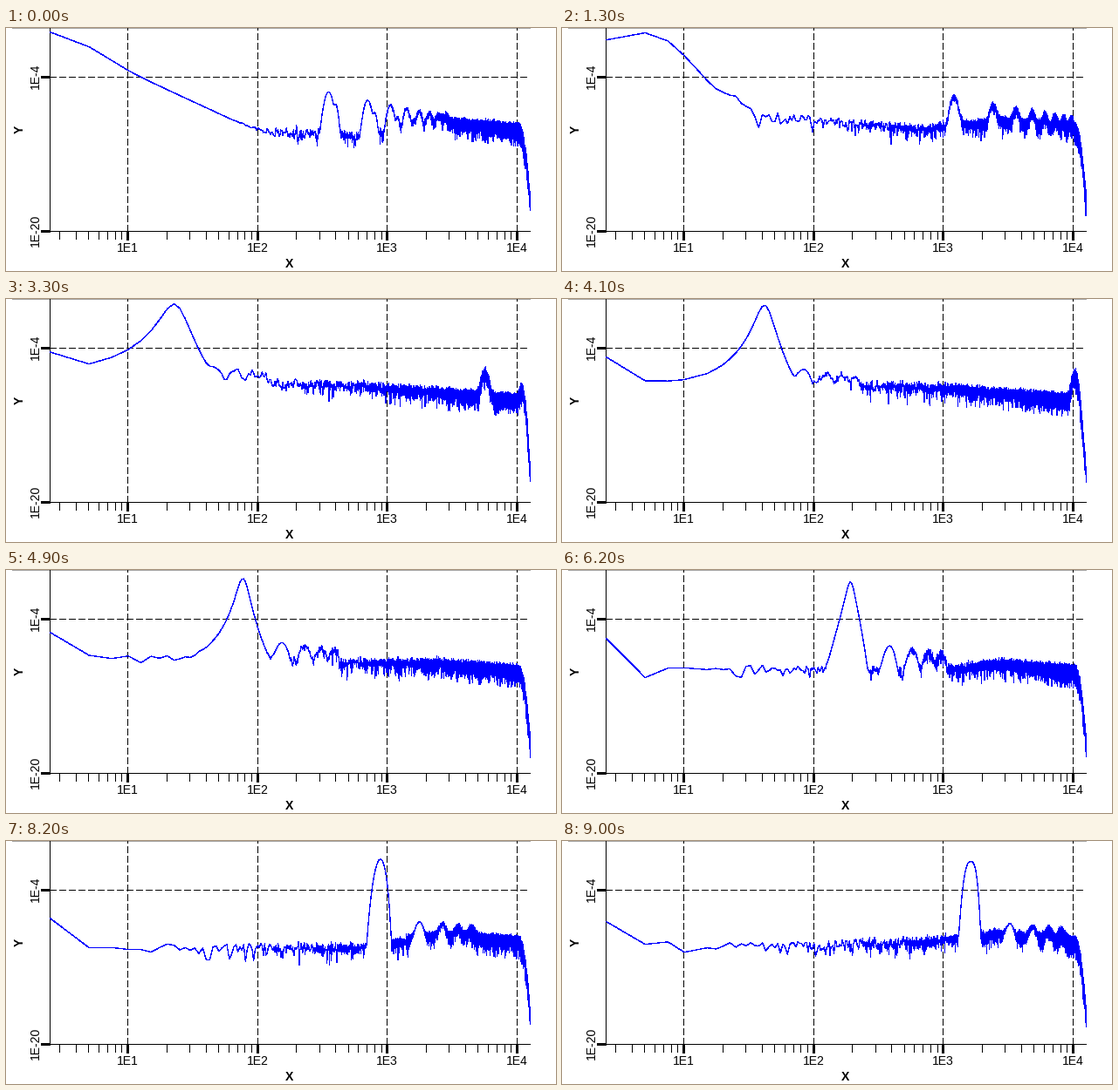
These frames come from a looping animation (630x279 px, 9300 ms). A matplotlib script:

```python
import numpy as np
import matplotlib.pyplot as plt
from matplotlib.animation import FuncAnimation

W, H, DPI = 630, 279, 100
PX = 72 / DPI            # points per pixel
LEFT, RIGHT, BOTTOM = 50, 600, 233
DECADE_X = 148.7         # pixels per decade of frequency
DECADE_Y = 11.06         # pixels per decade of power
STEP_MS, LOOP_MS = 100, 9300

plt.rcParams["font.family"] = "Liberation Sans"

BINS = np.arange(1, 5001)
X = LEFT + DECADE_X * np.log10(BINS)
# One step every 400 ms, after a short first one and a longer one at 4.9 s
STARTS = [0] + [100 + 400 * j + (100 if j > 12 else 0) for j in range(23)]


def power(y):
    return 10 ** (-np.minimum(y, 400) / DECADE_Y)


def floor(i):
    """Noise floor, whose left and middle parts sway with time."""
    left = 107 - 15 * np.cos(2 * np.pi * (i - 8.5) / 24)
    mid = 111 - 12 * np.cos(2 * np.pi * (i - 9.7) / 19)
    return power(np.interp(X, [245, 415, 500, 586], [left, mid, 106, 114]))


def skirt(i):
    """Leakage around zero frequency, sinking and steepening."""
    return power(8 + 17.5 * np.sqrt(i) + (30 + 5 * i) * np.log(BINS))


def main_tone(i, noise):
    """Swept tone with its first harmonics."""
    k0 = 10 ** ((192 + 19.7 * (i - 9) - LEFT) / DECADE_X)
    total = 0
    for h in range(1, 6):
        u = np.abs(BINS - h * k0) / (3 + .14 * h * k0)
        if h == 1:
            b = np.clip((i - 15) / 8, 0, 1)
            drop = (1 - b) * 28 * np.log(1 + 4 * u ** 2) + b * 38 * u ** 2.8
            total += power(5 + 1.4 * max(0, i - 10) + drop)
        else:
            top = 83 + 1.2 * (i - 13) + 3 * (h - 2)
            total += power(top + 30 * u ** 2) * noise ** (.25 * (h - 2))
    return total


def upper_tone(i, noise):
    """Second, higher tone; each harmonic has a weaker shoulder."""
    total = 0
    for h in range(1, 9):
        x = X - (369 + 19.9 * i + DECADE_X * np.log10(h))
        top = 73 + 1.2 * i + 13.5 * np.log(h)
        w = 7 / (1 + .06 * (h - 1))
        bump = (power(top + 23 * (x / w) ** 2)
                + power(top + 14 + 3 * i + 20 * ((x - 8) / 4) ** 2))
        total += bump * noise ** min(.8, .08 * i + .06 * (h - 1))
    return total


def spectrum(i):
    rng = np.random.default_rng(40 + i)
    noise = np.maximum(rng.exponential(size=len(X)), .003)
    total = (floor(i) * noise ** .75 + skirt(i)
             + main_tone(i, noise) + upper_tone(i, noise))
    roll = 85 * (np.maximum(X - 587, 0) / 13) ** 2
    return np.minimum(roll - DECADE_Y * np.log10(total), BOTTOM)


CURVES = [spectrum(i) for i in range(len(STARTS))]

fig = plt.figure(figsize=(W / DPI, H / DPI), dpi=DPI, facecolor="white")
ax = fig.add_axes([0, 0, 1, 1])
ax.set_xlim(0, W)
ax.set_ylim(H, 0)
ax.axis("off")


def rule(x0, y0, x1, y1, width=1, color="black", style="-"):
    ax.plot([x0, x1], [y0, y1], color=color, lw=width * PX, ls=style,
            aa=False, solid_capstyle="butt", dash_capstyle="butt")


def label(x, y, text, turn=0, weight="normal"):
    ax.text(x, y, text, fontsize=14 * PX, rotation=turn, weight=weight,
            ha="center", va="center")


def tick_x(freq):
    return int(LEFT + DECADE_X * np.log10(freq / 2.5))


DASH = (0, (7, 4))
rule(7, 0, RIGHT, 0, color="#a8a8a8")
rule(LEFT, 56, RIGHT, 56, style=DASH)
for e in range(1, 5):
    x = tick_x(10 ** e)
    rule(x, BOTTOM, x, 0, style=DASH)
    rule(x, BOTTOM, x, BOTTOM + 10, width=3)
    label(x, 253, f"1E{e}")
for e in range(4):
    for n in range(3 if e == 0 else 2, 10):
        x = tick_x(n * 10 ** e)
        rule(x, BOTTOM, x, BOTTOM + 9)
rule(LEFT, 0, LEFT, BOTTOM)
rule(LEFT, BOTTOM, RIGHT, BOTTOM)
for y, text in ((56, "1E-4"), (BOTTOM, "1E-20")):
    rule(40, y, LEFT, y, width=3)
    label(33.5, y - 1, text, turn=90)
label(324.5, 271, "X", weight="bold")
label(16, 116, "Y", turn=90, weight="bold")

# Without antialiasing every touched pixel is filled, so a hairline is 1 px
curve, = ax.plot([], [], color="#0000ff", lw=.3 * PX, aa=False, zorder=5)


def update(n):
    i = np.searchsorted(STARTS, n * STEP_MS, side="right") - 1
    curve.set_data(X + .5, CURVES[i] + .5)
    return curve,


anim = FuncAnimation(fig, update, frames=LOOP_MS // STEP_MS,
                     interval=STEP_MS, repeat=True, repeat_delay=0)
plt.show()
```
